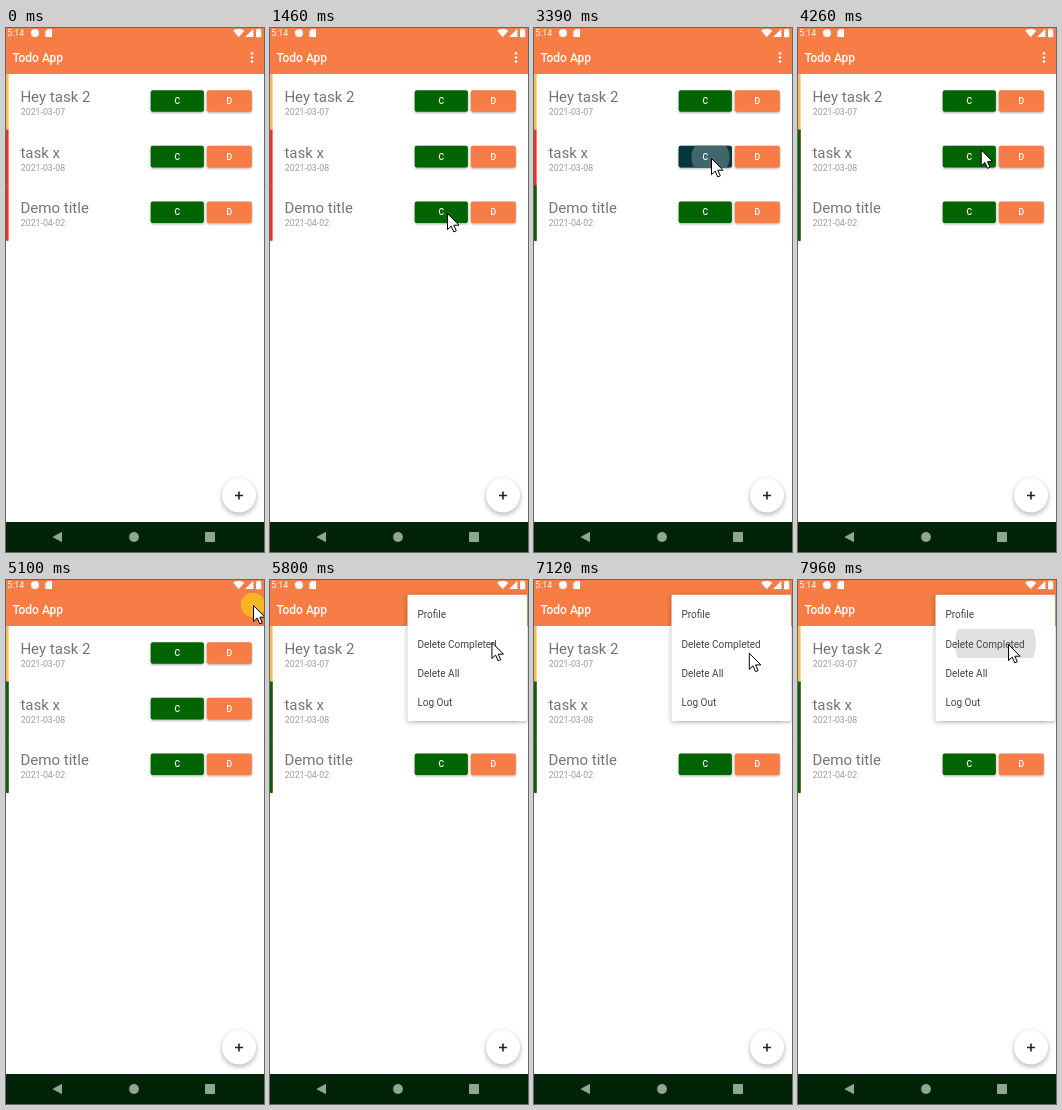
Recreate the animation shown at these times as an HTML page. Size 258x524 px, loop 8 s.

```html
<!DOCTYPE html>
<html lang="en">
<head>
<meta charset="utf-8">
<title>Todo list</title>
<style>
  html, body { margin: 0; width: 100%; height: 100%; overflow: hidden; background: #fff; }
  svg { display: block; width: 258px; height: 524px; font-family: Roboto, "Open Sans", sans-serif; }
  .title { font-size: 15.06px; fill: #757575; }
  .date { font-size: 8.78px; fill: #999; }
  .label { font-size: 8.6px; font-weight: 500; fill: #fff; text-anchor: middle; }
  .item { font-size: 10.03px; fill: #444; }
  .button { filter: drop-shadow(0 1px 1px rgba(0,0,0,.35)); }
  .fab { filter: drop-shadow(0 2px 2.5px rgba(0,0,0,.32)); }
  #menu { filter: drop-shadow(0 1px 2.5px rgba(0,0,0,.32)); }
</style>
</head>
<body>
<svg viewBox="0 0 258 524">
  <rect width="258" height="524" fill="#fff"/>
  <rect width="258" height="46" fill="#f77c45"/>

  <g fill="#fff">
    <text x="1.3" y="8.3" font-size="8.7">5:14</text>
    <circle cx="29" cy="5" r="4"/>
    <path d="M41.6 1H46V9H39.4V3.2Z"/>
    <path d="M227 2.6Q232.7 -1 238.4 2.6L232.7 9.2Z"/>
    <path d="M247.4 .8V9H239.2Z"/>
    <path d="M250 1.6H251.4V.6H253.8V1.6H255.2V9.2H250Z"/>
    <text x="6.4" y="33.8" font-size="12" font-weight="500">Todo App</text>
    <circle cx="246" cy="25.3" r="1.25"/>
    <circle cx="246" cy="29.4" r="1.25"/>
    <circle cx="246" cy="33.5" r="1.25"/>
  </g>

  <g id="rows"></g>

  <circle class="fab" cx="233" cy="467.5" r="17" fill="#fff"/>
  <path d="M229 467.5H237M233 463.5V471.5" stroke="#0a3210" stroke-width="1.6"/>

  <rect y="494" width="258" height="30" fill="#012408"/>
  <g fill="#8fa694">
    <path d="M46.3 509L56 503.8V514.2Z"/>
    <circle cx="128" cy="509" r="4.9"/>
    <rect x="199" y="504" width="10" height="10" rx=".8"/>
  </g>

  <g id="menu">
    <rect x="137.5" y="14.7" width="119.7" height="126.3" rx="1.4" fill="#fff"/>
    <clipPath id="itemClip"><rect x="137.5" y="49" width="119.7" height="29"/></clipPath>
    <circle id="itemRipple" cx="197.5" cy="63.5" r="40.5" fill="#e1e1e1" clip-path="url(#itemClip)"/>
    <g id="items"></g>
  </g>

  <circle id="press" r="12.2" fill="#f6bd1f" opacity=".88"/>
  <path id="cursor" d="M.5 .5V16.6L4.2 13.1L6.7 18.9L9.3 17.8L6.8 12.2H12Z"
    fill="#fff" stroke="#000" stroke-width="1" stroke-linejoin="round"/>
</svg>

<script>
const LOOP = 8000;
const GREEN = '#006400', ORANGE = '#f77c45';
const byId = id => document.getElementById(id);

const tasks = [
  { title: 'Hey task 2', date: '2021-03-07', color: '#fbbc4f' },
  { title: 'task x', date: '2021-03-08', color: '#f03022', doneAt: 3390 },
  { title: 'Demo title', date: '2021-04-02', color: '#f03022', doneAt: 2160 }
];

const button = (x, width, color, label, overlay = '') => `
  <rect class="button" x="${x}" y="16.2" width="${width}" height="21.6" rx="2" fill="${color}"/>
  ${overlay}
  <text class="label" x="${x + width / 2}" y="30.1">${label}</text>`;

const ripple = i => `
  <clipPath id="clip${i}"><rect x="144.7" y="16.2" width="53.2" height="21.6" rx="2"/></clipPath>
  <g id="ripple${i}" clip-path="url(#clip${i})">
    <rect x="144" y="16" width="55" height="22" fill="#04363b"/>
    <circle cx="176.5" cy="27.5" fill="#416669"/>
  </g>`;

byId('rows').innerHTML = tasks.map((task, i) => `
  <g transform="translate(0 ${46 + i * 55.6})">
    <rect width="2.6" height="55.6" fill="${task.color}"/>
    <rect id="done${i}" width="2.6" height="55.6" fill="${GREEN}" opacity="0"/>
    <text class="title" x="14.4" y="28.2">${task.title}</text>
    <text class="date" x="14.8" y="41.2">${task.date}</text>
    ${button(144.7, 53.2, GREEN, 'C', ripple(i))}
    ${button(200.8, 45, ORANGE, 'D')}
  </g>`).join('');

byId('items').innerHTML = ['Profile', 'Delete Completed', 'Delete All', 'Log Out']
  .map((name, i) => `<text class="item" x="147.4" y="${38.2 + i * 29.3}">${name}</text>`).join('');

// Pointer stops: time, x, y
const stops = [
  [440, 254, 512], [1230, 178, 186], [1400, 178, 186], [1460, 177, 185],
  [2640, 177, 185], [3180, 177, 130], [4110, 177, 130], [4970, 247, 25],
  [5350, 247, 25], [6050, 211, 77], [6180, 207, 78], [6490, 203, 67],
  [6830, 203, 67], [7090, 215, 73], [7350, 210, 66], [7440, 210, 66], [7500, 210, 64]
];
const presses = [[1990, 2160], [3220, 3390], [5020, 5250], [7810, 7960]];

const progress = (t, from, to) => Math.min(1, Math.max(0, (t - from) / (to - from)));
const ease = p => p * p * (3 - 2 * p);
const show = (el, visible) => el.setAttribute('visibility', visible ? 'visible' : 'hidden');

function pointerAt(t) {
  const next = stops.findIndex(stop => stop[0] > t);
  if (next < 0) return stops[stops.length - 1].slice(1);
  if (next === 0) return stops[0].slice(1);
  const [t0, x0, y0] = stops[next - 1], [t1, x1, y1] = stops[next];
  const p = ease(progress(t, t0, t1));
  return [x0 + (x1 - x0) * p, y0 + (y1 - y0) * p];
}

function drawTask(task, i, t) {
  const group = byId('ripple' + i);
  const age = t - task.doneAt;
  const active = age >= 0 && age < 380;
  show(group, active);
  if (active) {
    group.lastElementChild.setAttribute('r', 19 + age * 0.2);
    group.setAttribute('opacity', 1 - progress(age, 230, 380));
  }
  byId('done' + i).setAttribute('opacity', task.doneAt ? progress(age, 230, 350) : 0);
}

function draw(t) {
  tasks.forEach((task, i) => drawTask(task, i, t));

  const opened = ease(progress(t, 5180, 5400));
  const scale = 0.6 + 0.4 * opened;
  const menu = byId('menu');
  show(menu, opened > 0);
  menu.setAttribute('opacity', opened);
  menu.setAttribute('transform', `translate(257 14.7) scale(${scale}) translate(-257 -14.7)`);
  byId('itemRipple').setAttribute('opacity', t >= 7960 ? 1 : 0);

  const at = `translate(${pointerAt(t)})`;
  byId('cursor').setAttribute('transform', at);
  byId('press').setAttribute('transform', at);
  show(byId('cursor'), t >= 460);
  show(byId('press'), presses.some(([from, to]) => t >= from && t < to));
}

const start = performance.now();
function tick() {
  draw((performance.now() - start) % LOOP);
  requestAnimationFrame(tick);
}
tick();
</script>
</body>
</html>
```
